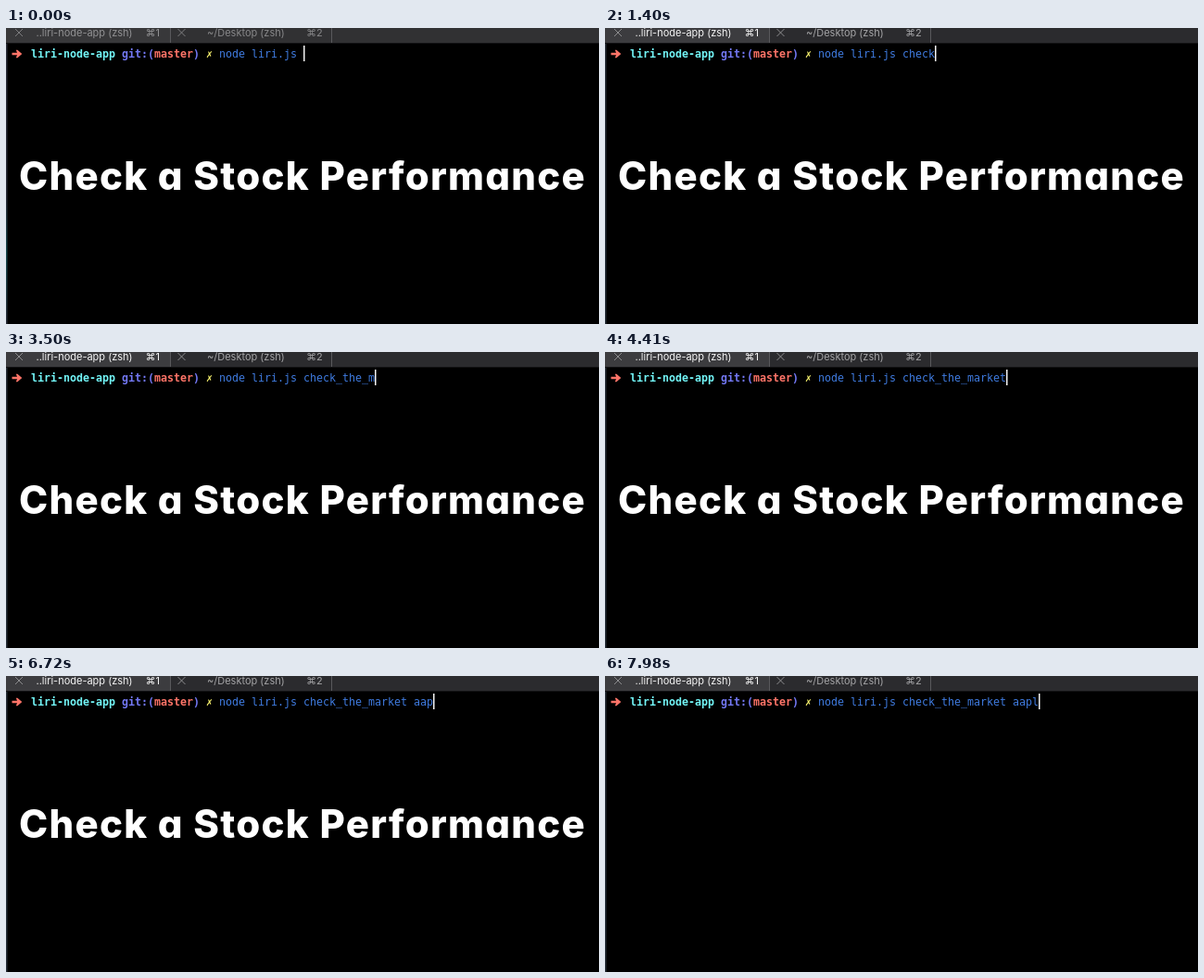
An HTML page with a canvas that plays this animation: 640 by 320 pixels, repeating every 8000 ms.

```html
<!DOCTYPE html>
<html lang="en">
<head>
<meta charset="utf-8">
<title>Terminal demo</title>
<style>
  html, body { margin: 0; width: 100%; height: 100%; overflow: hidden; background: #000; }
  #stage { position: relative; width: 640px; height: 320px; overflow: hidden; }
  canvas, svg { position: absolute; left: 0; top: 0; display: block; }
  #title {
    font: 800 42px Inter, "Open Sans", sans-serif;
    font-feature-settings: "cv11" 1;
    fill: #fff;
  }
</style>
</head>
<body>
<div id="stage">
  <canvas id="screen" width="640" height="320"></canvas>
  <svg width="640" height="320"><text id="title" x="14" y="175">Check a Stock Performance</text></svg>
</div>
<script>
const ctx = document.getElementById('screen').getContext('2d');
const title = document.getElementById('title');

const LOOP = 8000, STEP = 70, CELL = 7, BASE = 32;
const MONO = '11.63px "DejaVu Sans Mono", "Liberation Mono", monospace';
const UI = '11px Inter, Roboto, sans-serif';
const TYPED = 'check_the_market aapl';
// Time at which each typed character appears
const KEYS = [
  700, 910, 1120, 1260, 1400, 1610, 2030, 2170, 2450, 2940,
  3430, 3570, 3710, 3990, 4200, 4410, 5110, 6300, 6510, 6650, 6790
];

const clamp = v => Math.max(0, Math.min(1, v));
const ramp = (t, from, to) => clamp((t - from) / (to - from));

function mix(a, b, k) {
  const c = a.map((v, i) => Math.round(v + (b[i] - v) * k));
  return `rgb(${c.join(',')})`;
}

function text(str, x, y, color, font) {
  ctx.font = font;
  ctx.fillStyle = color;
  ctx.fillText(str, x, y);
}

function rect(x, y, w, h, color) {
  ctx.fillStyle = color;
  ctx.fillRect(x, y, w, h);
}

function closeMark(x, color) {
  ctx.strokeStyle = color;
  ctx.lineWidth = 1;
  ctx.beginPath();
  ctx.moveTo(x, 1); ctx.lineTo(x + 8, 9);
  ctx.moveTo(x + 8, 1); ctx.lineTo(x, 9);
  ctx.stroke();
}

function drawTabs(focus) {
  const back = mix([49, 49, 51], [43, 43, 46], focus);
  const front = mix([56, 56, 58], [60, 60, 63], focus);
  const label = mix([145, 145, 147], [245, 245, 245], focus);
  const dim = mix([135, 135, 137], [164, 164, 166], focus);
  const mark = mix([125, 125, 127], [140, 140, 142], focus);

  rect(0, 0, 640, 16, back);
  rect(0, 0, 177, 16, front);
  for (const x of [177, 351]) rect(x, 0, 1, 16, '#59595c');
  rect(0, 16, 640, 1, '#111113');

  closeMark(10, mark);
  closeMark(185.5, mark);
  text('..liri-node-app (zsh)', 32.5, 9, label, UI);
  text('⌘1', 150.5, 9, label, UI);
  text('~/Desktop (zsh)', 217, 9, dim, UI);
  text('⌘2', 324, 9, dim, UI);
}

function drawEdge(focus) {
  const glow = ctx.createLinearGradient(0, 17, 0, 320);
  const base = mix([40, 44, 56], [38, 46, 56], focus);
  glow.addColorStop(0, base);
  glow.addColorStop(0.55, base);
  glow.addColorStop(0.75, mix([22, 72, 78], [36, 48, 58], focus));
  glow.addColorStop(1, base);
  rect(0, 17, 1.5, 303, glow);
}

function drawArrow() {
  ctx.fillStyle = '#ff7468';
  ctx.beginPath();
  const pts = [[6.5, 26.7], [12, 26.7], [10.8, 23.8], [12.4, 23.8],
    [17.3, 28], [12.4, 32.2], [10.8, 32.2], [12, 29.3], [6.5, 29.3]];
  pts.forEach(([x, y]) => ctx.lineTo(x, y));
  ctx.fill();
}

function drawPrompt(count) {
  const bold = 'bold ' + MONO;
  drawArrow();
  text('liri-node-app', 27, BASE, '#72f5f7', bold);
  text('git:(', 125, BASE, '#7378f5', bold);
  text('master', 160, BASE, '#ff7468', bold);
  text(')', 202, BASE, '#7378f5', bold);
  text('✗', 216, BASE, '#fbf56f', bold);
  text('node liri.js ' + TYPED.slice(0, count), 230, BASE, '#3f7be0', MONO);
  rect(321 + count * CELL, 19, 1.5, 17, '#f4f4f4');
}

function render(now) {
  const t = Math.floor((now % LOOP) / STEP) * STEP;
  const focus = ramp(t, 0, 350);
  rect(0, 0, 640, 320, '#000');
  drawTabs(focus);
  drawEdge(focus);
  drawPrompt(KEYS.filter(k => k <= t).length);
  title.style.opacity = 1 - ramp(t, 7420, 7960);
}

// Track the headline so that it spans the stage between its margins
const spare = 612 - title.getComputedTextLength();
title.style.letterSpacing = spare / title.textContent.length + 'px';

const start = performance.now();
function frame() {
  render(performance.now() - start);
  requestAnimationFrame(frame);
}
frame();
</script>
</body>
</html>
```
